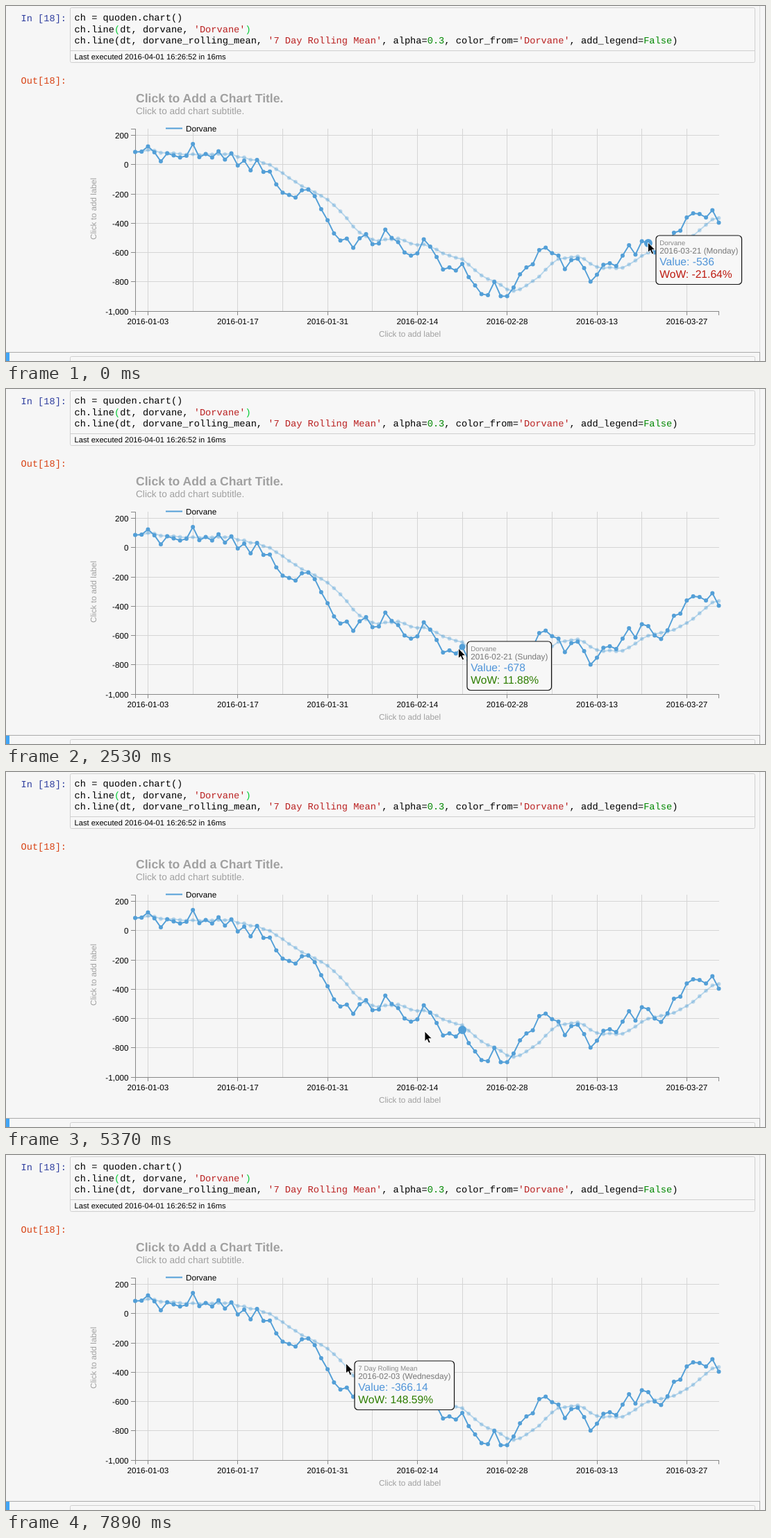
Write an HTML page that moves like this. It is 1093 px wide and 512 px high and loops after 8000 ms.

```html
<!DOCTYPE html>
<html lang="en">
<head>
<meta charset="utf-8">
<title>Chart hover</title>
<style>
  html, body { margin: 0; width: 100%; height: 100%; overflow: hidden; background: #f6f6f6; }
  svg { display: block; width: 100vw; height: 100vh; font: 11.7px Arial, "Liberation Sans", sans-serif; }
  text { white-space: pre; text-rendering: geometricPrecision; }
  .code { font: 13.67px "Liberation Mono", monospace; }
  .str { fill: #ba2121; }
  .num { fill: #080; }
  .match { fill: #0c3; }
  .hint { fill: #a0a0a0; }
  .sharp { shape-rendering: crispEdges; fill: none; }
</style>
</head>
<body>
<svg id="stage" viewBox="0 0 1093 512"></svg>
<script>
const stage = document.getElementById('stage');
const SERIES = 'Dorvane', MEAN = '7 Day Rolling Mean', BLUE = '#539fd7';

function add(parent, tag, attrs, content) {
  const el = document.createElementNS('http://www.w3.org/2000/svg', tag);
  for (const key in attrs) el.setAttribute(key, attrs[key]);
  if (content !== undefined) el.innerHTML = content;
  return parent.appendChild(el);
}
const text = (x, y, content, attrs = {}, parent = stage) => add(parent, 'text', { x, y, ...attrs }, content);
const line = (d, stroke) => add(stage, 'path', { d, stroke, class: 'sharp' });
const box = (x, y, w, h) => add(stage, 'rect',
  { x, y, width: w, height: h, rx: 2, fill: '#f7f7f7', stroke: '#cfcfcf' });

// Notebook cells
const str = s => `<tspan class="str">'${s}'</tspan>`;
const num = s => `<tspan class="num">${s}</tspan>`;
const match = s => `<tspan class="match">${s}</tspan>`;
const code = (x, y, content, fill = '#000') => text(x, y, content, { class: 'code', fill });

box(92.5, 2.5, 986, 79);
line('M93 64.5H1078', '#cfcfcf');
code(21.5, 22, 'In [18]:', '#303f9f');
code(21.5, 112, 'Out[18]:', '#d84315');
code(98.6, 21, 'ch = quoden.chart()');
code(98.6, 37.5, `ch.line${match('(')}dt, ${SERIES.toLowerCase()}, ${str(SERIES)}${match(')')}`);
code(98.6, 54, `ch.line(dt, ${SERIES.toLowerCase()}_rolling_mean, ${str(MEAN)}, alpha=${num('0.3')}, ` +
  `color_from=${str(SERIES)}, add_legend=${num('False')})`);
text(98.5, 77, 'Last executed 2016-04-01 16:26:52 in 16ms', { 'font-size': 11.15 });

line('M1085.5 0V499', '#dcdcdc');
line('M0 499.5H1085.5V512', '#ababab');
add(stage, 'rect', { y: 500, width: 5, height: 12, fill: '#42a5f5' });
box(92.5, 505.5, 986, 30);

// Data
const daily = [86, 89, 124, 84, 22, 77, 63, 49, 60, 141, 51, 72, 49, 91, 34, 77, -6, 27, -39, 32,
  -50, -47, -135, -192, -207, -225, -175, -171, -215, -304, -380, -470, -518, -505, -568, -503,
  -475, -543, -538, -444, -501, -529, -600, -621, -606, -510, -560, -631, -716, -702, -723, -678,
  -768, -825, -884, -891, -801, -898, -898, -839, -749, -702, -680, -583, -567, -605, -621, -714,
  -652, -643, -707, -799, -752, -684, -673, -692, -621, -550, -614, -523, -536, -600, -624, -565,
  -465, -451, -361, -333, -337, -361, -311, -396];
const rolling = daily.map((_, i) => {
  const week = daily.slice(Math.max(0, i - 6), i + 1);
  return week.reduce((a, b) => a + b) / week.length;
});
const px = i => 186 + i * 840.5 / 91;
const py = v => 228.75 - v * 0.21125;
const day = i => new Date(Date.UTC(2016, 0, 1 + i));
const iso = i => day(i).toISOString().slice(0, 10);

// Axes and grid
const snap = v => Math.floor(v) + 0.5;
for (let i = 2; i < 92; i += 7) line(`M${snap(px(i))} 177V440`, '#d5d5d5');
for (let v = 200; v >= -1000; v -= 200) {
  const y = snap(py(v));
  if (v > -1000) line(`M186 ${y}H1027`, '#d5d5d5');
  line(`M180 ${y}H186`, '#888');
  text(176.5, y + 4, v.toLocaleString('en-US'), { 'text-anchor': 'end' });
}
for (let i = 2; i < 92; i += 14) {
  line(`M${snap(px(i))} 440V446`, '#888');
  text(px(i), 458.5, iso(i), { 'text-anchor': 'middle' });
}
line('M180 177.5H186.5V440M186.5 446V440.5H1026.5V446', '#888');

text(187, 139, 'Click to Add a Chart Title.', { class: 'hint', 'font-size': 17.55, 'font-weight': 'bold' });
text(187, 156, 'Click to add chart subtitle.', { class: 'hint', 'font-size': 13.65 });
text(537, 476.5, 'Click to add label', { class: 'hint' });
text(0, 0, 'Click to add label', { class: 'hint', transform: 'translate(130 337) rotate(-90)' });
add(stage, 'path', { d: 'M230 176.5H254', stroke: BLUE, 'stroke-width': 2 });
text(259, 181, SERIES);

function plot(values, radius, opacity) {
  const d = 'M' + values.map((v, i) => `${px(i)} ${py(v)}`).join('L');
  add(stage, 'path', { d, fill: 'none', stroke: BLUE, 'stroke-width': 1.9, opacity });
  return values.map((v, i) => add(stage, 'circle', { cx: px(i), cy: py(v), r: radius, fill: BLUE, opacity }));
}
plot(rolling, 2.8, 0.37);
const dots = plot(daily, 3, 1);

// Tooltip and pointer
const tip = add(stage, 'g', {});
const frame = add(tip, 'rect', { height: 70.5, rx: 5, fill: '#f7f7f7', stroke: '#111', 'stroke-width': 1.2 });
const [nameRow, dateRow, valueRow, changeRow] = [
  [14, 9.75, '#888'], [26, 11.75, '#777'], [43.3, 15.6, '#4f94d8'], [61, 15.6, '']
].map(([y, size, fill]) => text(5.3, y, '', { 'font-size': size, fill }, tip));
const pointer = add(stage, 'path',
  { d: 'M0 0V14.5L3.3 11.5L5.7 17L8.2 16L5.8 10.6H10.3Z', stroke: '#fff', 'stroke-width': 0.9 });

function showTip(values, i, x, y) {
  const change = (values[i] / values[i - 7] - 1) * 100;
  const weekday = day(i).toLocaleDateString('en-US', { weekday: 'long', timeZone: 'UTC' });
  nameRow.textContent = values === daily ? SERIES : MEAN;
  dateRow.textContent = `${iso(i)} (${weekday})`;
  valueRow.textContent = 'Value: ' + Number(values[i].toFixed(2));
  changeRow.textContent = `WoW: ${change.toFixed(2)}%`;
  changeRow.setAttribute('fill', change < 0 ? '#bd1a10' : '#2d7d00');
  frame.setAttribute('width', dateRow.getComputedTextLength() + 10.5);
  tip.setAttribute('transform', `translate(${x} ${y})`);
}

const states = [
  { at: 0, tip: [daily, 80, 936, 331], dot: [80, 6] },
  { at: 1500, tip: [daily, 79, 926, 329], dot: [80, 6] },
  { at: 1650 },
  { at: 2530, tip: [daily, 51, 664, 364], dot: [51, 4.5] },
  { at: 2680, tip: [daily, 51, 665, 364], dot: [51, 6] },
  { at: 3570, tip: [daily, 51, 666, 364], dot: [51, 6] },
  { at: 5370, dot: [51, 6] },
  { at: 5515 },
  { at: 6100, tip: [daily, 34, 510, 338], dot: [34, 4.5] },
  { at: 6250, tip: [daily, 34, 510, 338], dot: [34, 6] },
  { at: 7600, dot: [34, 6] },
  { at: 7745 },
  { at: 7890, tip: [rolling, 33, 502, 297] }
];

const smooth = p => p * p * (3 - 2 * p);
const easeOut = p => 1 - (1 - p) ** 2;
const moves = [
  { start: 0, end: 1, steps: 1, from: [924.5, 341], to: [924.5, 341], ease: smooth },
  { start: 1500, end: 2530, steps: 7, from: [896, 331], to: [651.5, 374], ease: smooth },
  { start: 2680, end: 3570, steps: 6, from: [652, 374], to: [654.5, 372], ease: smooth },
  { start: 5370, end: 6250, steps: 6, from: [603, 374], to: [498, 348], ease: easeOut },
  { start: 7600, end: 7890, steps: 2, from: [496, 336], to: [489.5, 300.5], ease: easeOut }
];

let current;
function render(now) {
  const t = now % 8000;
  const state = states.findLast(s => s.at <= t);
  if (state !== current) {
    if (current && current.dot) dots[current.dot[0]].setAttribute('r', 3);
    if (state.dot) dots[state.dot[0]].setAttribute('r', state.dot[1]);
    tip.setAttribute('visibility', state.tip ? 'visible' : 'hidden');
    if (state.tip) showTip(...state.tip);
    current = state;
  }
  const { start, end, steps, from, to, ease } = moves.findLast(m => m.start <= t);
  const progress = Math.min(1, (t - start) / (end - start));
  const p = ease(Math.floor(progress * steps + 0.02) / steps);
  const [x, y] = from.map((v, i) => v + (to[i] - v) * p);
  pointer.setAttribute('transform', `translate(${x} ${y})`);
}

const origin = performance.now();
function loop() {
  render(performance.now() - origin);
  requestAnimationFrame(loop);
}
loop();
</script>
</body>
</html>
```
